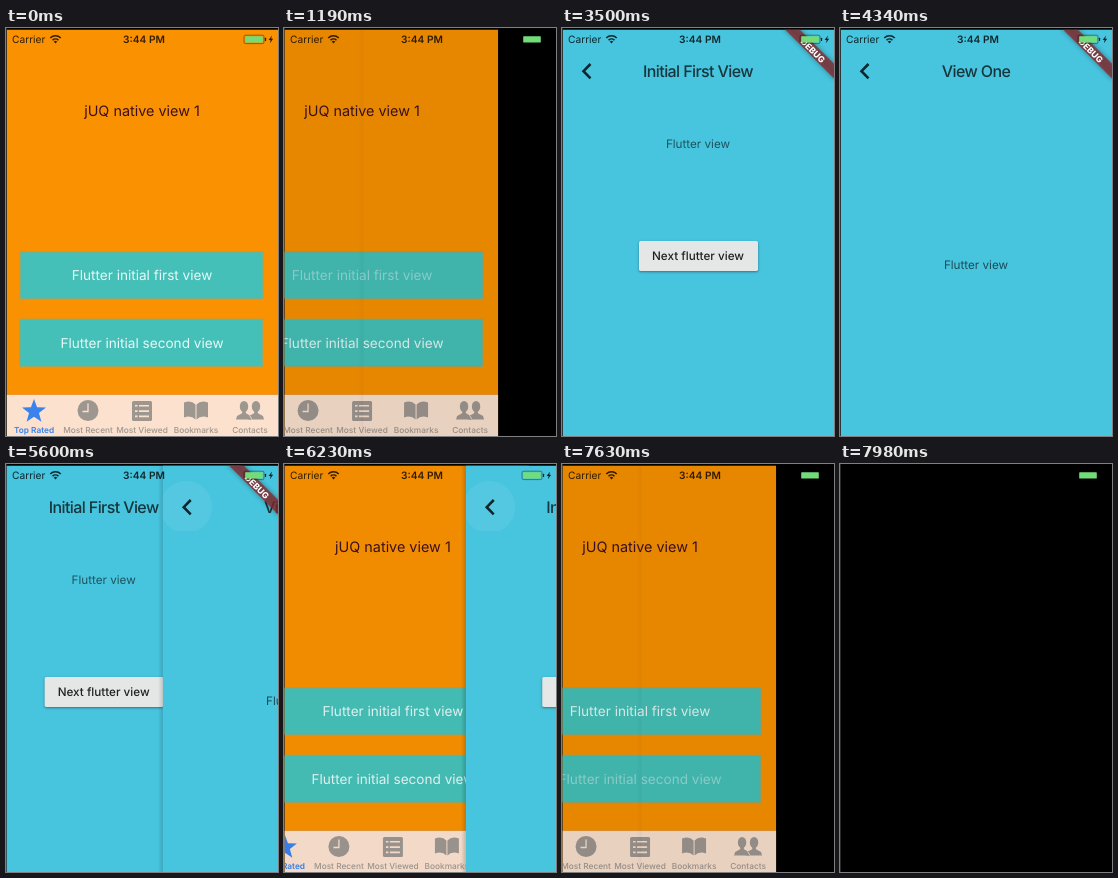
Write an HTML page with a canvas that moves like this. It is 272x408 px and loops after 8000 ms.

```html
<!DOCTYPE html>
<html lang="en">
<head>
<meta charset="utf-8">
<title>Navigation demo</title>
<style>
  html, body { margin: 0; width: 100%; height: 100%; overflow: hidden; background: #000; }
  canvas { display: block; width: 272px; height: 408px; }
</style>
</head>
<body>
<canvas id="stage" width="272" height="408"></canvas>
<script>
const ctx = document.getElementById('stage').getContext('2d');
const LOOP = 8000, STEP = 70;
const LEFT = .7, TOP = 1.6, WIDTH = 271.3, HEIGHT = 406.4, MID = 136;
const ORANGE = '#f99100', TEAL = '#45c0b8', CYAN = '#47c4de', BAR = '#fbe1ce', GREY = '#9e9790', BLUE = '#3a82ee';

const clamp = v => Math.max(0, Math.min(1, v));
const span = (t, start, length) => clamp((t - start) / length);

// Cubic bezier easing (.25, .1, .25, 1), solved by bisection.
function ease(x) {
  if (x <= 0 || x >= 1) return clamp(x);
  const curve = (u, a, b) => 3 * u * (1 - u) ** 2 * a + 3 * u * u * (1 - u) * b + u ** 3;
  let low = 0, high = 1;
  for (let i = 0; i < 20; i++) {
    const mid = (low + high) / 2;
    if (curve(mid, .25, .25) < x) low = mid; else high = mid;
  }
  return curve(low, .1, 1);
}

function box(x, y, w, h, color, radius = 0) {
  ctx.fillStyle = color;
  ctx.beginPath();
  ctx.roundRect(x, y, w, h, radius);
  ctx.fill();
}

function disc(x, y, r, color) {
  ctx.fillStyle = color;
  ctx.beginPath();
  ctx.arc(x, y, r, 0, 7);
  ctx.fill();
}

function polyline(points, color, width) {
  ctx.strokeStyle = color;
  ctx.lineWidth = width;
  ctx.beginPath();
  points.forEach(([x, y]) => ctx.lineTo(x, y));
  ctx.stroke();
}

function polygon(points, color) {
  ctx.fillStyle = color;
  ctx.beginPath();
  points.forEach(([x, y]) => ctx.lineTo(x, y));
  ctx.fill();
}

function text(str, x, y, size, color, { weight = 400, align = 'center', spacing = 0 } = {}) {
  ctx.font = `${weight} ${size}px Inter, sans-serif`;
  ctx.textRendering = 'geometricPrecision';
  ctx.textAlign = align;
  ctx.letterSpacing = spacing + 'px';
  ctx.fillStyle = color;
  ctx.fillText(str, x, y);
}

function shifted(x, draw) {
  ctx.save();
  ctx.translate(x, 0);
  draw();
  ctx.restore();
}

// Icons are drawn around their own centre.
const icons = {
  star(color) {
    polygon(Array.from({ length: 10 }, (_, i) => {
      const r = i % 2 ? 5.2 : 12.6, a = i * Math.PI / 5 - Math.PI / 2;
      return [r * Math.cos(a), r * Math.sin(a) + 1];
    }), color);
  },
  clock(color) {
    disc(0, 0, 10.5, color);
    polyline([[0, -7], [0, 1], [-5.5, 1]], BAR, 1.3);
  },
  list(color) {
    box(-10, -9.5, 20, 20, color, 1.5);
    for (const y of [-5.5, -.2, 5.1]) {
      box(-7, y, 2.5, 1.6, BAR);
      box(-3, y, 10, 1.6, BAR);
    }
  },
  book(color) {
    for (const side of [-1, 1]) {
      ctx.fillStyle = color;
      ctx.beginPath();
      ctx.moveTo(side * .5, -6);
      ctx.quadraticCurveTo(side * 5, -11, side * 12, -8);
      ctx.lineTo(side * 12, 7);
      ctx.quadraticCurveTo(side * 5, 4.5, side * .5, 9);
      ctx.fill();
    }
  },
  people(color) {
    for (const x of [6, -6]) {
      ctx.fillStyle = color;
      ctx.beginPath();
      ctx.ellipse(x, -4, 4.2, 5.5, 0, 0, 7);
      ctx.fill();
      box(x - 1.8, 0, 3.6, 4, color);
      polygon([[x - 8, 9], [x - 7, 5.5], [x - 1.5, 2.5], [x + 1.5, 2.5], [x + 7, 5.5], [x + 8, 9]], color);
    }
    polyline([[-.5, 4.8], [2, 9]], BAR, .8);
  }
};

const tabs = [
  ['star', 'Top Rated'], ['clock', 'Most Recent'], ['list', 'Most Viewed'],
  ['book', 'Bookmarks'], ['people', 'Contacts']
];

function home(alphas, dim) {
  box(LEFT, TOP, WIDTH, HEIGHT, ORANGE);
  text('jUQ native view 1', MID, 88, 14.4, '#3a1022');
  ['first', 'second'].forEach((name, i) => {
    const x = 13.8 - i * .6, y = 223.2 + i * 67.5;
    box(x, y, 243.7, 48, '#7fae83');
    box(x + 1.3, y + 1.3, 241.1, 45.4, TEAL);
    ctx.globalAlpha = alphas[i];
    text(`Flutter initial ${name} view`, MID, y + 28.8, 13.6, '#e6f8f7');
    ctx.globalAlpha = 1;
  });
  box(LEFT, 367, WIDTH, 41, BAR);
  box(LEFT, 366.5, WIDTH, .5, '#d9a066');
  tabs.forEach(([icon, label], i) => {
    const color = i ? GREY : BLUE, x = 28 + i * 54;
    ctx.save();
    ctx.translate(x, 382.5);
    icons[icon](color);
    ctx.restore();
    text(label, x, 405, 8.3, color, { weight: i ? 500 : 600 });
  });
  box(LEFT, TOP, WIDTH, HEIGHT, `rgba(0,0,0,${.1 * dim})`);
}

function edgeShadow(strength) {
  const g = ctx.createLinearGradient(LEFT - 5, 0, LEFT, 0);
  g.addColorStop(0, 'rgba(0,0,0,0)');
  g.addColorStop(1, `rgba(0,0,0,${strength})`);
  ctx.fillStyle = g;
  ctx.fillRect(LEFT - 5, TOP, 5, HEIGHT);
}

function ripple(x, y, radius, age) {
  if (age <= 0 || age >= 1) return;
  const alpha = .07 * Math.min(1, (1 - age) * 3);
  disc(x, y, radius * Math.min(1, .3 + age * 2), `rgba(255,255,255,${alpha})`);
}

function appPage(title, rippleAge) {
  box(LEFT, TOP, WIDTH, HEIGHT, CYAN);
  ctx.save();
  ctx.beginPath();
  ctx.rect(LEFT, TOP, WIDTH, 65.4);
  ctx.clip();
  ripple(24, 43, 26, rippleAge);
  ctx.restore();
  polyline([[28.5, 36], [21.5, 43.2], [28.5, 50.4]], '#10262c', 2.6);
  text(title, MID, 49, 16, '#17353c', { weight: 500, spacing: -.6 });
}

function firstView(t) {
  appPage('Initial First View', span(t, 5950, 560));
  text('Flutter view', MID, 120, 11.7, 'rgba(0,0,0,.58)');
  ctx.save();
  ctx.shadowColor = 'rgba(0,0,0,.4)';
  ctx.shadowBlur = 2.5;
  ctx.shadowOffsetY = 1;
  box(77, 213, 119, 30, t >= 3920 && t < 4340 ? '#d6d6d6' : '#e5e6e6', 1.7);
  ctx.restore();
  text('Next flutter view', MID, 232, 11.7, '#1f1f1f', { weight: 500 });
}

function viewOne(t) {
  appPage('View One', span(t, 5390, 490));
  text('Flutter view', MID, 241, 11.7, 'rgba(0,0,0,.62)');
}

function debugBanner() {
  ctx.save();
  ctx.translate(272, TOP);
  ctx.rotate(Math.PI / 4);
  ctx.save();
  ctx.shadowColor = 'rgba(0,0,0,.5)';
  ctx.shadowBlur = 5;
  box(-36, 24.2, 72, 10.4, 'rgba(140,38,42,.75)');
  ctx.restore();
  text('DEBUG', 0, 33, 8.6, '#fff', { weight: 800 });
  ctx.restore();
}

// The second app page slides over the first, which drifts left by a third.
function appStack(t) {
  const cover = ease(span(t, 3920, 420)) - ease(span(t, 5460, 420));
  if (cover < 1) shifted(-cover * WIDTH / 3, () => firstView(t));
  if (cover > 0) shifted((1 - cover) * WIDTH, () => {
    if (cover < 1) edgeShadow(.15);
    viewOne(t);
  });
  debugBanner();
}

function statusBar() {
  const ink = 'rgba(0,0,0,.8)';
  text('Carrier', 6, 15, 10.2, ink, { align: 'left' });
  text('3:44 PM', 138, 15, 10.2, ink, { weight: 600 });
  ctx.strokeStyle = ink;
  ctx.lineWidth = 1.6;
  for (const r of [4.2, 7.4]) {
    ctx.beginPath();
    ctx.arc(49.5, 15.2, r, -Math.PI * .75, -Math.PI * .25);
    ctx.stroke();
  }
  polygon([[49.5, 15.6], [47.7, 13.6], [49.5, 12.8], [51.3, 13.6]], ink);
  ctx.strokeStyle = 'rgba(0,0,0,.55)';
  ctx.lineWidth = .7;
  ctx.beginPath();
  ctx.roundRect(238, 7.2, 20, 8.4, 1.5);
  ctx.stroke();
  box(239.2, 8.2, 17.6, 6.4, '#72dc78', .6);
  box(258.9, 9.7, 1.2, 3.2, ink, .5);
  polygon([[266, 7.6], [262.6, 12], [264.6, 12], [263.9, 15.2], [267.2, 10.7], [265.2, 10.7]], ink);
}

// A pressed button's label dims, then fades back.
function labelAlpha(t, press) {
  return t < press ? 1 : .2 + .8 * span(t, press + 245, 500);
}

// The pushed page is still empty, so only its edge shows over the home page.
function push(t, start, alphas) {
  const p = ease(span(t, start, 500));
  shifted(-81.6 * p, () => home(alphas, p));
  if (p > 0 && p < 1) shifted(WIDTH * (1 - p), () => edgeShadow(.04));
}

function scene(t) {
  if (t < 1540) push(t, 980, [labelAlpha(t, 770), 1]);
  else if (t < 1960) return;
  else if (t < 6650) {
    const p = ease(span(t, 6035, 500));
    if (p > 0) shifted(-81.6 * (1 - p), () => home([1, 1], 1 - p));
    if (p < 1) shifted(WIDTH * p, () => {
      if (p > 0) edgeShadow(.18);
      appStack(t);
    });
  }
  else if (t < 7980) push(t, 7420, [1, labelAlpha(t, 7210)]);
}

const begin = performance.now();

function frame() {
  const elapsed = Math.max(0, performance.now() - begin) % LOOP;
  const t = Math.floor(elapsed / STEP) * STEP;
  box(0, 0, 272, 408, '#000');
  box(0, 0, 1, 408, '#2a2a2a');
  ctx.save();
  ctx.beginPath();
  ctx.rect(LEFT, TOP, WIDTH, HEIGHT);
  ctx.clip();
  scene(t);
  statusBar();
  ctx.restore();
  requestAnimationFrame(frame);
}
frame();
</script>
</body>
</html>
```
